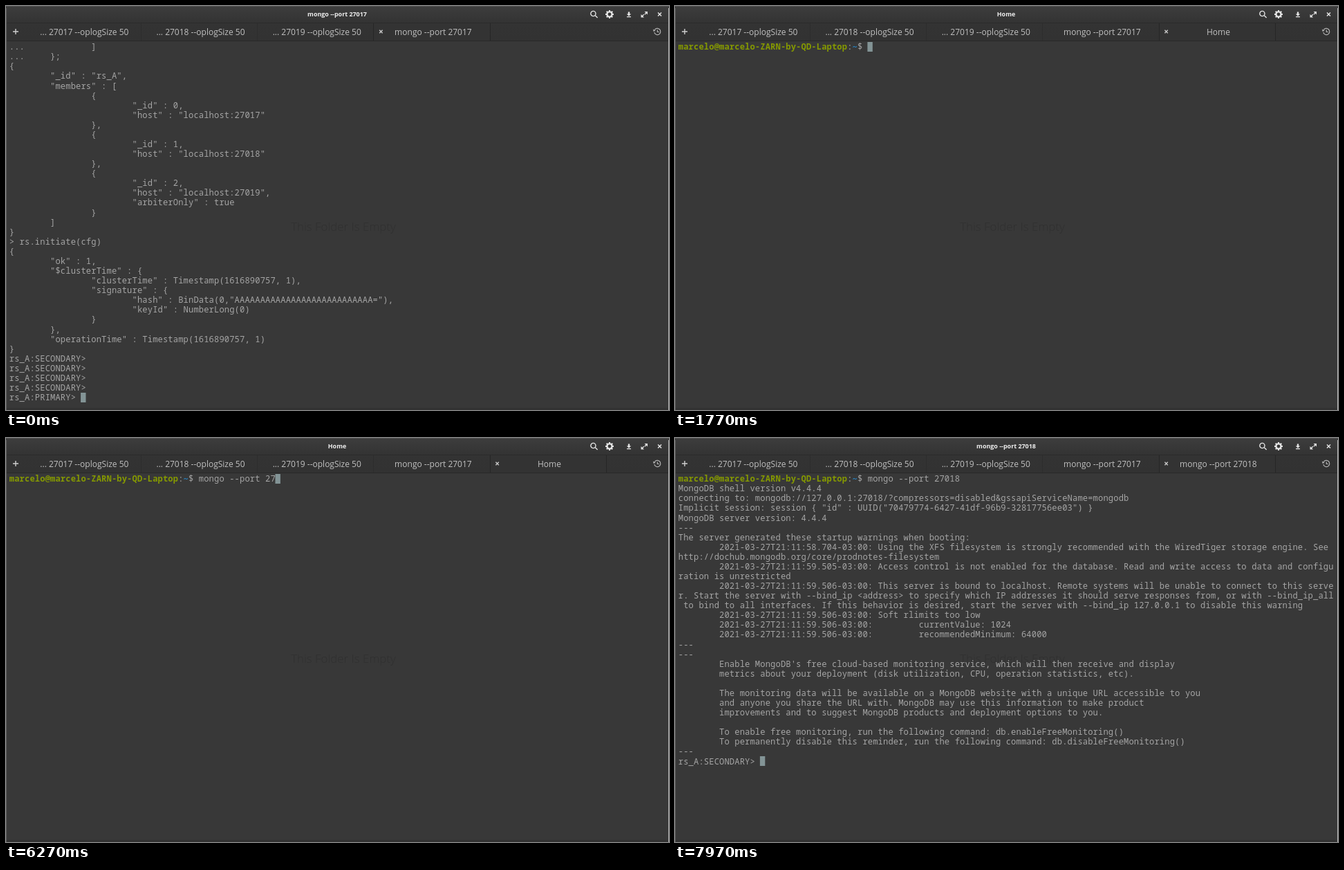
An HTML page with a canvas for the animation above (8000 ms loop, 959 px wide and 584 px high).

```html
<!DOCTYPE html>
<html lang="en">
<head>
<meta charset="utf-8">
<title>Terminal</title>
<style>
html, body { margin: 0; width: 100%; height: 100%; overflow: hidden; background: #383838; }
canvas { display: block; }
</style>
</head>
<body>
<canvas id="stage" width="959" height="584"></canvas>
<script>
const ctx = document.getElementById('stage').getContext('2d');
const LOOP = 8000, CELL_W = 7.405, CELL_H = 14.08, LEFT = 4.8, TOP = 52;
const MONO = '12.1px "Roboto Mono", "Noto Sans Mono", monospace';
const SANS = '"Open Sans", "Noto Sans", sans-serif';
const FG = '#a5a5a5', CURSOR = '#839496', TAB_FONT = '12px', TAB_W = 168.2;

const replicaLog = `...             ]
...     };
{
        "_id" : "rs_A",
        "members" : [
                {
                        "_id" : 0,
                        "host" : "localhost:27017"
                },
                {
                        "_id" : 1,
                        "host" : "localhost:27018"
                },
                {
                        "_id" : 2,
                        "host" : "localhost:27019",
                        "arbiterOnly" : true
                }
        ]
}
> rs.initiate(cfg)
{
        "ok" : 1,
        "$clusterTime" : {
                "clusterTime" : Timestamp(1616890757, 1),
                "signature" : {
                        "hash" : BinData(0,"${'A'.repeat(27)}="),
                        "keyId" : NumberLong(0)
                }
        },
        "operationTime" : Timestamp(1616890757, 1)
}
rs_A:SECONDARY>
rs_A:SECONDARY>
rs_A:SECONDARY>
rs_A:SECONDARY>
rs_A:PRIMARY> `.split('\n');

const shellLog = `MongoDB shell version v4.4.4
connecting to: mongodb://127.0.0.1:27018/?compressors=disabled&gssapiServiceName=mongodb
Implicit session: session { "id" : UUID("70479774-6427-41df-96b9-32817756ee03") }
MongoDB server version: 4.4.4
---
The server generated these startup warnings when booting:
        2021-03-27T21:11:58.704-03:00: Using the XFS filesystem is strongly recommended with the WiredTiger storage engine. See
http://dochub.mongodb.org/core/prodnotes-filesystem
        2021-03-27T21:11:59.505-03:00: Access control is not enabled for the database. Read and write access to data and configu
ration is unrestricted
        2021-03-27T21:11:59.506-03:00: This server is bound to localhost. Remote systems will be unable to connect to this serve
r. Start the server with --bind_ip <address> to specify which IP addresses it should serve responses from, or with --bind_ip_all
 to bind to all interfaces. If this behavior is desired, start the server with --bind_ip 127.0.0.1 to disable this warning
        2021-03-27T21:11:59.506-03:00: Soft rlimits too low
        2021-03-27T21:11:59.506-03:00:         currentValue: 1024
        2021-03-27T21:11:59.506-03:00:         recommendedMinimum: 64000
---
---
        Enable MongoDB's free cloud-based monitoring service, which will then receive and display
        metrics about your deployment (disk utilization, CPU, operation statistics, etc).

        The monitoring data will be available on a MongoDB website with a unique URL accessible to you
        and anyone you share the URL with. MongoDB may use this information to make product
        improvements and to suggest MongoDB products and deployment options to you.

        To enable free monitoring, run the following command: db.enableFreeMonitoring()
        To permanently disable this reminder, run the following command: db.disableFreeMonitoring()
---
rs_A:SECONDARY> `.split('\n');

const host = 'marcelo@marcelo-ZARN-by-QD-Laptop';
const command = 'mongo --port 27018';
const keyTimes = [3330, 3500, 3670, 3800, 3930, 4500, 4670, 4870, 5070, 5130,
  5270, 5330, 5670, 6000, 6230, 6600, 6830, 7030];
// [time, lines of shell output visible]
const outputSteps = [[7700, 1], [7770, 4], [7830, 16], [7900, 28], [7930, 29]];

const ramp = (t, from, to) => Math.min(1, Math.max(0, (t - from) / (to - from)));

function rect(x, y, w, h, color) {
  ctx.fillStyle = color;
  ctx.fillRect(x, y, w, h);
}

function shade(y, h, from, to) {
  const g = ctx.createLinearGradient(0, y, 0, y + h);
  g.addColorStop(0, from);
  g.addColorStop(1, to);
  rect(0, y, 959, h, g);
}

function label(str, x, y, font, color) {
  ctx.font = font + ' ' + SANS;
  ctx.textAlign = 'center';
  ctx.fillStyle = color;
  ctx.fillText(str, x, y);
}

function stroke(path, color, width) {
  ctx.strokeStyle = color;
  ctx.lineWidth = width;
  ctx.stroke(new Path2D(path));
}

function fill(path, color) {
  ctx.fillStyle = color;
  ctx.fill(new Path2D(path));
}

function cross(x, y, r, color, width) {
  stroke(`M${x - r} ${y - r}l${2 * r} ${2 * r}m0 ${-2 * r}l${-2 * r} ${2 * r}`, color, width);
}

function mono(str, col, row, color = FG, weight = '') {
  ctx.font = weight + ' ' + MONO;
  ctx.textAlign = 'left';
  ctx.letterSpacing = '0px';
  ctx.letterSpacing = CELL_W - ctx.measureText('0').width + 'px';
  ctx.fillStyle = color;
  ctx.fillText(str, LEFT + col * CELL_W, TOP + row * CELL_H + 11.2);
  ctx.letterSpacing = '0px';
}

function cursor(col, row, hollow) {
  const x = LEFT + col * CELL_W - 0.4, y = Math.round(TOP + row * CELL_H);
  if (hollow) {
    ctx.strokeStyle = CURSOR;
    ctx.lineWidth = 1;
    ctx.strokeRect(Math.round(x) - 0.5, y - 0.5, 8, 14);
  } else rect(x, y, CELL_W, 14, CURSOR);
}

function icons() {
  const c = '#e4e4e4';
  stroke('M853 11a3.6 3.6 0 1 1-7.2 0a3.6 3.6 0 1 1 7.2 0M852.1 13.6l3.5 3.5', c, 1.4);
  stroke('M876.6 12a3.6 3.6 0 1 1-7.2 0a3.6 3.6 0 1 1 7.2 0', c, 2.4);
  for (let i = 0; i < 8; i++) {
    const a = i * Math.PI / 4, x = Math.cos(a), y = Math.sin(a);
    stroke(`M${873 + 4 * x} ${12 + 4 * y}L${873 + 6 * x} ${12 + 6 * y}`, c, 2);
  }
  fill('M899.8 8.5h2.4v3h2l-3.2 3.2l-3.2-3.2h2zM898 15h6v1.2h-6z', c);
  fill('M923.5 8h4.5v4.5zM923 16.5h-4.5v-4.5z', c);
  stroke('M926.5 9.5l-2.7 2.7M920 15l2.7-2.7', c, 1.4);
  cross(945.5, 12, 2.5, c, 1.5);
  stroke('M938.2 34.6a4.6 4.6 0 1 1-.5 3.6M942.3 34.5v3h2.4', '#b4b4b4', 1.2);
  fill('M936 33.5l.6 3.6l3-1.4z', '#b4b4b4');
}

function chrome(t, title, opened) {
  shade(0, 25, '#3d3d3d', '#333333');
  rect(0, 0, 959, 1, '#515151');
  shade(25, 26, '#333333', '#323232');
  rect(0, 24, 959, 1, '#2b2b2b');

  const hover = ramp(t, 470, 670) * (1 - ramp(t, 1570, 1770));
  rect(2, 25, 24, 25, `rgba(255,255,255,${0.09 * hover})`);
  stroke('M10 37h8M14 33v8', '#cfcfcf', 1.4);

  const active = opened > 0 ? 4 : 3;
  const start = 27 + TAB_W * active;
  const width = active === 4 ? TAB_W * opened : TAB_W;
  rect(start, 25, width, 26, '#333333');
  rect(0, 50, 959, 1, '#292929');
  for (let i = 1; i <= active; i++)
    rect(Math.round(26.8 + TAB_W * i), 25, 1, 25, i === active ? '#262626' : '#2d2d2d');
  rect(Math.round(start + width - 0.3), 25, 1, 25, '#262626');

  ['... 27017 --oplogSize 50', '... 27018 --oplogSize 50', '... 27019 --oplogSize 50',
    'mongo --port 27017'].forEach((name, i) => label(name, 113.3 + TAB_W * i, 42, TAB_FONT, '#c0c0c0'));
  ctx.save();
  ctx.beginPath();
  ctx.rect(start, 25, width, 26);
  ctx.clip();
  if (active === 4) label(title, start + width / 2 + 2, 42, TAB_FONT, '#c0c0c0');
  cross(start + 10.8, 37, 2.2, '#c8c8c8', 1.4);
  ctx.restore();

  label(title, 479, 15, 'bold 8.95px', '#eeeeee');
  icons();
}

function newTab(t) {
  const typed = keyTimes.filter(k => k <= t).length;
  mono(host, 0, 0, '#859900', 'bold');
  mono(':', 33, 0);
  mono('~', 34, 0, '#268bd2', 'bold');
  mono('$ ' + command.slice(0, typed), 35, 0);
  if (t < 7600) {
    if (t < 2100 || t >= 2700) cursor(37 + typed, 0);
    return;
  }
  const shown = outputSteps.reduce((n, [time, lines]) => t >= time ? lines : n, 0);
  shellLog.slice(0, shown).forEach((line, i) => mono(line, 0, i + 1));
  if (shown === shellLog.length) cursor(shellLog[shown - 1].length, shown);
  else cursor(0, shown + 1);
}

function draw(t) {
  const opened = ramp(t, 1500, 1770);
  const isNew = t >= 1530;
  const title = !isNew ? 'mongo --port 27017' : t < 7670 ? 'Home' : command;
  rect(0, 0, 959, 584, '#383838');
  label('This Folder Is Empty', 488, 325, '300 16.9px', '#303030');

  if (isNew) newTab(t);
  else {
    replicaLog.forEach((line, i) => mono(line, 0, i));
    cursor(14, 36, t >= 1270);
    rect(953, 312, 2, 269, `rgba(205,205,205,${ramp(t, 30, 230)})`);
  }
  chrome(t, title, isNew ? opened : 0);
  rect(0, 581, 959, 3, '#323232');
  rect(0, 3, 1, 581, '#5c5c5c');
  rect(958, 3, 1, 581, '#b8b8b8');
}

const begin = performance.now();
function tick() {
  draw((performance.now() - begin) % LOOP);
  requestAnimationFrame(tick);
}
tick();
</script>
</body>
</html>
```
